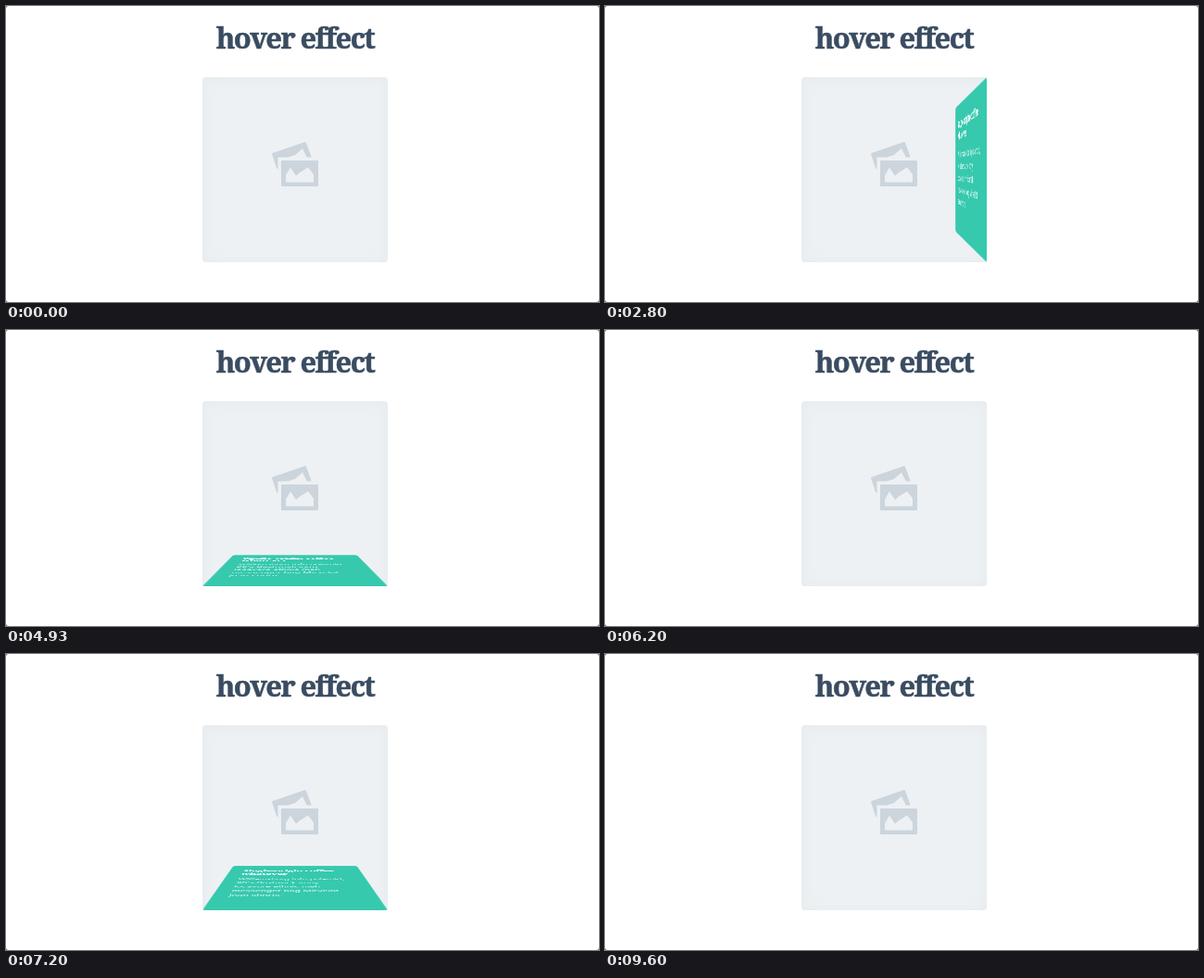
An HTML page that plays this animation: 640x320 px, repeating every 9790 ms.

```html
<!DOCTYPE html>
<html lang="en">
<head>
<meta charset="utf-8">
<title>hover effect</title>
<style>
  html, body { margin: 0; width: 100%; height: 100%; overflow: hidden; background: #777; }
  .stage { position: relative; width: 640px; height: 320px; border-radius: 3px; background: #fff; overflow: hidden; }
  h1, h3 { margin: 0; font-family: "Noto Serif", serif; font-weight: 700; }
  h1 {
    position: absolute; left: 112px; top: 14px; width: 400px;
    font-size: 31px; line-height: 40px; letter-spacing: -.052em;
    text-align: center; color: #3a4c61; -webkit-text-stroke: .5px;
  }
  .card {
    position: absolute; left: 212px; top: 77px; width: 200px; height: 200px;
    border-radius: 4px; background: #edf1f4;
    box-shadow: inset 0 1px 16px #e6eaed;
    perspective: 400px;
  }
  .card svg { position: absolute; left: 0; top: 0; }
  .info {
    position: absolute; inset: 0; box-sizing: border-box; padding: 20px;
    border-radius: 4px; background: #36c9ae; color: #fff;
    box-shadow: 0 0 1px #36c9ae, inset 0 0 1px #cdeee8;
    white-space: nowrap; visibility: hidden;
  }
  h3 { font-size: 15px; line-height: 18px; letter-spacing: -.027em; -webkit-text-stroke: .3px; }
  p {
    margin: 12px 0 0; font: 12px/18px Inter, "Open Sans", sans-serif;
    letter-spacing: -.1px; color: #eefaf7;
  }
</style>
</head>
<body>
<div class="stage">
  <h1>hover effect</h1>
  <div class="card">
    <svg width="200" height="200" viewBox="212 77 200 200">
      <g fill="#ccd4dc" stroke="#ccd4dc" stroke-width="2" stroke-linejoin="round">
        <path d="M288 160 L323 148 L328.5 163 L293 175 Z"/>
        <g fill="#edf1f4" stroke="none">
          <path d="M303 164 L312 161 L320 154 L325 164 Z"/>
          <rect x="293.5" y="163.5" width="47" height="35"/>
        </g>
        <rect x="298" y="168" width="38" height="26"/>
        <path fill="#edf1f4" stroke="none" d="M302 190.5 V183 L307 174.5 L313 183.5 L317 180 L326 174.5 L332 182 V190.5 Z"/>
      </g>
    </svg>
    <div class="info">
      <h3>Single-origin coffee<br>whatever</h3>
      <p>Williamsburg tofu polaroid,<br>90's Bushwick irony<br>locavore ethnic meh<br>messenger bag Mirvelot<br>jean shorts.</p>
    </div>
  </div>
</div>
<script>
  const LOOP = 9790, DURATION = 300, IN_ANGLE = 90, OUT_ANGLE = 104;

  const sides = {
    top:    { origin: "50% 0",    axis: "X", sign: -1 },
    right:  { origin: "100% 50%", axis: "Y", sign: -1 },
    bottom: { origin: "50% 100%", axis: "X", sign: 1 },
    left:   { origin: "0 50%",    axis: "Y", sign: 1 }
  };

  // Each visit: enter time and side, leave time and side.
  const visits = [
    [1200, "left",   2030, "right"],
    [2800, "right",  3290, "left"],
    [3870, "top",    4430, "bottom"],
    [4930, "bottom", 5490, "top"],
    [6400, "top",    7050, "bottom"],
    [7530, "bottom", 7890, "top"]
  ];

  const info = document.querySelector(".info");

  // The CSS "ease" curve: cubic-bezier(.25, .1, .25, 1).
  function ease(x) {
    if (x <= 0) return 0;
    if (x >= 1) return 1;
    const curve = (a, b, s) => 3 * a * s * (1 - s) ** 2 + 3 * b * s * s * (1 - s) + s ** 3;
    let lo = 0, hi = 1;
    for (let i = 0; i < 24; i++) {
      const mid = (lo + hi) / 2;
      if (curve(.25, .25, mid) < x) lo = mid; else hi = mid;
    }
    return curve(.1, 1, lo);
  }

  function fold(name, angle) {
    const side = sides[name];
    info.style.visibility = "visible";
    info.style.transformOrigin = side.origin;
    info.style.transform = angle ? `rotate${side.axis}(${side.sign * angle}deg)` : "none";
  }

  function draw(t) {
    const visit = visits.find(v => t >= v[0] && t < v[2] + DURATION);
    if (!visit) {
      info.style.visibility = "hidden";
      return;
    }
    const [enter, from, leave, to] = visit;
    if (t < leave) fold(from, IN_ANGLE * (1 - ease((t - enter) / DURATION)));
    else fold(to, OUT_ANGLE * ease((t - leave) / DURATION));
  }

  const start = performance.now();
  function tick() {
    draw((performance.now() - start) % LOOP);
    requestAnimationFrame(tick);
  }
  tick();
</script>
</body>
</html>
```
